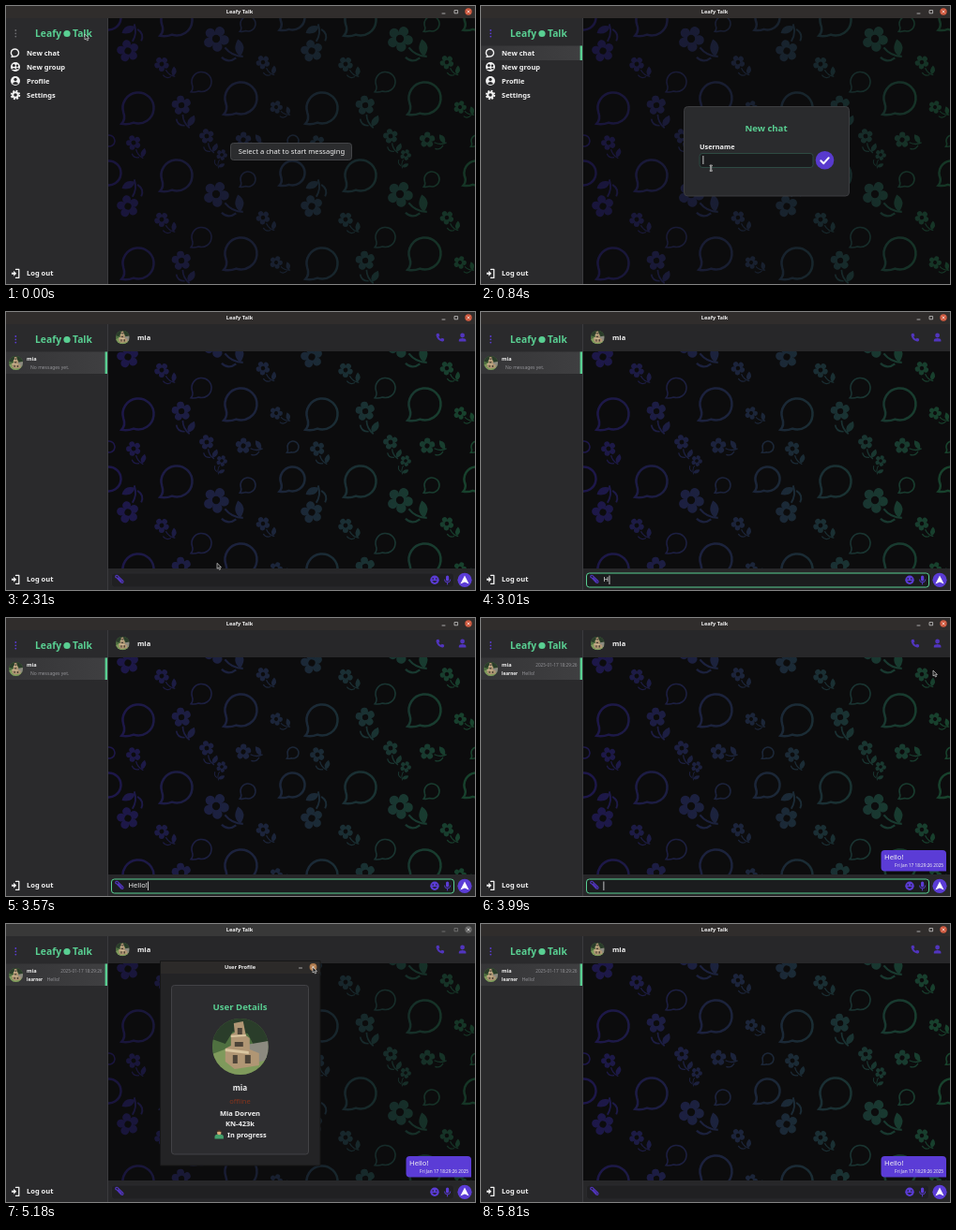
Recreate the animation shown at these times as an HTML page. Size 500 px wide and 297 px high, loop 5880 ms.

```html
<!DOCTYPE html>
<html lang="en">
<head>
<meta charset="utf-8">
<title>Messenger demo</title>
<style>
html, body { margin: 0; width: 100%; height: 100%; overflow: hidden; background: #0c0c0d; }
svg { display: block; width: 100vw; height: 100vh; }
text { font: 7.5px "Noto Sans", "Open Sans", sans-serif; fill: #f2f2f2; white-space: pre; }
.b { font-weight: 700; }
.m { text-anchor: middle; }
.e { text-anchor: end; }
.green { fill: #59cf92; }
.dim { fill: #929296; }
.tiny { font-size: 4.7px; }
.bar { font-size: 5.7px; }
.head { font-size: 9.6px; }
.line { fill: none; stroke-linecap: round; stroke-linejoin: round; }
.violet { fill: #5135bd; }
</style>
</head>
<body>
<svg viewBox="0 0 500 297" preserveAspectRatio="none">
  <defs>
    <linearGradient id="tint" gradientUnits="userSpaceOnUse" x1="109" y1="0" x2="500" y2="0">
      <stop offset="0" stop-color="#1f1850"/>
      <stop offset=".52" stop-color="#1d2a3b"/>
      <stop offset="1" stop-color="#19482f"/>
    </linearGradient>
    <linearGradient id="row">
      <stop offset="0" stop-color="#353537"/>
      <stop offset="1" stop-color="#3f3f41"/>
    </linearGradient>
    <clipPath id="round"><circle r="30"/></clipPath>
    <g id="tile" fill="none" stroke="#fff"></g>
    <mask id="doodles" maskUnits="userSpaceOnUse" x="109" y="13" width="391" height="284"></mask>
    <g id="photo" clip-path="url(#round)">
      <path fill="#4f7040" d="M-30-30h60v60h-60z"/>
      <path fill="#2a3d2a" d="M-30-30H30V-6L14-2 8-14-8-16-16-3-30-8z"/>
      <path fill="#7f9a5c" d="M-30 8L-14 2 4 16 30 10V30H-30z"/>
      <path fill="#8c8a80" d="M6-2L30-6V14L12 18z"/>
      <path fill="#b09674" d="M-7-25L3-27 6-12 10-9V3l10 4v13l-26 4-10-8V2l6-3v-12l4-2z"/>
      <path fill="#4d4438" d="M-3-20h5v7h-5zM-6-5h9v5h-9zM-8 9h5v9h-5zM5 9h6v9H5z"/>
      <path fill="#dac6a0" d="M-16 2L9 5v3l-25-3zM-10-12l16-1v2l-16 1z"/>
    </g>
  </defs>

  <path fill="#0c0c0d" d="M0 0h500v297H0z"/>
  <path id="wall" fill="url(#tint)" mask="url(#doodles)" d="M109 13h391v284H109z"/>

  <path fill="#2a2a2c" d="M0 13h108v284H0z"/>
  <path fill="#3b3b3e" d="M108 13h1v284h-1z"/>
  <path id="titleBar" d="M0 0h500v13H0z"/>
  <text class="b m bar" x="249" y="8.3">Leafy Talk</text>
  <path id="buttons" class="line" stroke-width=".7" d="M465 8h3M478.4 4.6h3.2v3.2h-3.2z"/>
  <circle id="close" cx="493" cy="6" r="3.7"/>
  <path class="line" stroke="#fff" stroke-width=".6" d="M491.8 4.8l2.4 2.4m0-2.4l-2.4 2.4"/>

  <g id="dots"><circle cx="10.3" cy="26" r=".9"/><circle cx="10.3" cy="29.3" r=".9"/><circle cx="10.3" cy="32.6" r=".9"/></g>
  <text class="b e green" style="font-size:10.3px" x="59" y="33">Leafy</text>
  <circle cx="65" cy="29.5" r="3.6" fill="#59cf92"/>
  <text class="b green" style="font-size:10.3px" x="71" y="33">Talk</text>

  <g id="menu">
    <g id="picked"><path fill="url(#row)" d="M0 42.5h108V58H0z"/><path fill="#59cf92" d="M105.6 42.5h2.4V58h-2.4z"/></g>
    <path class="line" stroke="#f2f2f2" stroke-width="1.4" d="M7 53.2A4.1 4 0 1 1 9.2 54L6 54.4z"/>
    <circle cx="10" cy="65" r="5" fill="#f2f2f2"/>
    <g fill="#2a2a2c"><circle cx="8.4" cy="63.5" r="1.5"/><circle cx="12" cy="63.7" r="1.2"/><path d="M5.8 68q2.6-3.6 5.2 0zM11.6 67.8q-.3-1.4-.8-1.8 2-.8 3.2 1.2z"/></g>
    <circle cx="10" cy="80" r="5" fill="#f2f2f2"/>
    <g fill="#2a2a2c"><circle cx="10" cy="78.5" r="1.7"/><path d="M6.8 83q3.2-3.8 6.4 0-3 2-6.4 0z"/></g>
    <circle cx="10" cy="95" r="4.3" fill="none" stroke="#f2f2f2" stroke-width="1.8" stroke-dasharray="1.9 1.477"/>
    <circle cx="10" cy="95" r="2.8" fill="none" stroke="#f2f2f2" stroke-width="2"/>
    <text class="b" x="22" y="52.8">New chat</text>
    <text class="b" x="22" y="67.8">New group</text>
    <text class="b" x="22" y="82.8">Profile</text>
    <text class="b" x="22" y="97.8">Settings</text>
  </g>
  <path fill="#f2f2f2" d="M6 284.8h2.2v-2l3 3-3 3v-2H6z"/>
  <path class="line" stroke="#f2f2f2" stroke-width="1.3" d="M10.5 281.4h3.3v9h-3.3"/>
  <text class="b" x="22" y="288.4">Log out</text>

  <g id="hint">
    <rect x="239.5" y="146.5" width="129" height="18" rx="3" fill="#2b2c2e" stroke="#444548"/>
    <text class="m" style="font-size:7.6px" x="304.5" y="158.3">Select a chat to start messaging</text>
  </g>

  <g id="dialog">
    <rect x="216.5" y="107.5" width="176" height="95.5" rx="4" fill="#2a2b2d" stroke="#3c3d40"/>
    <text class="b m green head" x="304" y="133.7">New chat</text>
    <text class="b" style="font-size:7.3px" x="233" y="153">Username</text>
    <rect id="nameField" x="233" y="157.5" width="121" height="15" rx="3" fill="#1b1c1e"/>
    <text id="name" x="236.5" y="167.3"></text>
    <path id="nameCaret" fill="#eee" d="M0 160h.8v9H0z"/>
    <circle id="ok" cx="366.5" cy="164.8" r="9.8"/>
    <path class="line" stroke="#fff" stroke-width="2" d="M362.3 165.2l3 3 5.4-6"/>
  </g>

  <g id="chat">
    <path fill="url(#row)" d="M0 42.5h108V66H0z"/>
    <path fill="#59cf92" d="M105.6 42.5h2.4V66h-2.4z"/>
    <use href="#photo" transform="translate(10.5 54.5) scale(.25)"/>
    <text class="b" style="font-size:5.6px" x="22" y="52">mia</text>
    <text id="empty" class="dim" style="font-size:5px" x="26" y="61">No messages yet.</text>
    <g id="last">
      <text class="dim e tiny" x="102.5" y="51.8">2025-01-17 18:29:26</text>
      <text class="b tiny" x="22" y="60.8">learner</text>
      <text class="dim" style="font-size:5.2px" x="43.5" y="60.8">Hello!</text>
    </g>
    <path fill="#272729" d="M109 13h391v29H109zM109 274h391v23H109z"/>
    <use href="#photo" transform="translate(124.3 27) scale(.245)"/>
    <text class="b" x="140" y="30">mia</text>
    <path class="violet" d="M459.4 23l2-.3 1 2.6-1.1 1.1q.8 1.7 2.3 2.4l1.2-1 2.4 1-.3 2q-.7 1-2 .7-5.4-1.6-6.3-6.6 0-1.2.8-1.9z"/>
    <circle class="violet" cx="486.6" cy="25" r="2.4"/>
    <path class="violet" d="M482.8 31.5v-1.6q.5-1.9 3.8-1.9t3.8 1.9v1.6z"/>

    <rect id="field" x="112.5" y="279" width="365" height="15" rx="3"/>
    <path class="line" stroke="#5135bd" stroke-width="1.1" d="M117.2 283.2l5.6 5.8q1.7 1 2.2-.5.2-.8-.5-1.5l-5.5-5.4q-1.4-.8-2.1.3-.5.9.2 1.8M119.5 284l3.8 3.8"/>
    <text id="draft" x="130.5" y="288.4"></text>
    <path id="draftCaret" fill="#eee" d="M0 281.5h.8v9.5H0z"/>
    <circle cx="457" cy="286.3" r="4.7" fill="#5b3cd6"/>
    <g fill="#1d1d20"><circle cx="455.2" cy="285" r=".8"/><circle cx="458.8" cy="285" r=".8"/><path d="M454.4 287.3h5.2q-2.6 3.6-5.2 0z"/></g>
    <rect x="469" y="281.5" width="3.2" height="6" rx="1.6" fill="#5b3cd6"/>
    <path class="line" stroke="#5b3cd6" stroke-width=".9" d="M467.5 286q0 3 3.1 3t3.1-3M470.6 289v2"/>
    <circle cx="489" cy="286.3" r="7.6" fill="#5b3cd6"/>
    <path fill="#fff" d="M489 281.4l4.6 9-4.6-1.8-4.6 1.8z"/>
  </g>

  <g id="message">
    <path fill="#5b3cd6" d="M430.5 248h61.5q4 0 4 4v18.5h-65.500q-4 0-4-4V252q0-4 4-4z"/>
    <text style="font-size:7.6px" x="430" y="257.6">Hello!</text>
    <text class="e tiny" x="493" y="266">Fri Jan 17 18:29:26 2025</text>
  </g>

  <g id="profile">
    <path fill="#232325" stroke="#161617" d="M164.5 39.5H335V258H164.5z"/>
    <path fill="#2c2a29" d="M165 40h169.5v13H165z"/>
    <text class="b m bar" x="249.5" y="48.4">User Profile</text>
    <path class="line" stroke="#ddd" stroke-width=".7" d="M312.5 47h3"/>
    <circle cx="327.5" cy="46" r="3.9" fill="#b07a4c"/>
    <path class="line" stroke="#fff" stroke-width=".6" d="M326.3 44.8l2.4 2.4m0-2.4l-2.4 2.4"/>
    <rect x="176.5" y="65.5" width="146" height="180.5" rx="3" fill="#2c2c2f" stroke="#424246"/>
    <text class="b m green head" x="249.5" y="91.5">User Details</text>
    <use href="#photo" transform="translate(249.8 131)"/>
    <text class="b m" style="font-size:8.2px" x="249.5" y="177.500">mia</text>
    <text class="m" style="fill:#85341d" x="249.5" y="192">offline</text>
    <text class="b m" x="249.5" y="205">Mia Dorven</text>
    <text class="b m" x="249.5" y="216.3">KN-423k</text>
    <path fill="#43a06b" d="M222.5 229.5V227q0-2.5 4.7-2.5t4.700 2.5v2.5z"/>
    <circle cx="227.2" cy="223" r="2.3" fill="#d9a878"/>
    <path fill="#4b3527" d="M224.7 222.6q0-2.5 2.5-2.5t2.5 2.5q-2.500-1.5-5 0z"/>
    <text class="b" style="font-size:7.4px" x="236" y="227.6">In progress</text>
  </g>

  <path id="pointer" fill="#202020" stroke="#ededed" stroke-width=".6"/>
</svg>
<script>
const LOOP = 5880, STEP = 70;
const ARROW = 'M0 0v6l1.4-1.2 1.1 2.2 1.1-.5-1-2.1h1.9z';
const BEAM = 'M0 0h2.4v.8h-.7v4.800h.7v.8H0v-.8h.7V.8H0z';
const $ = id => document.getElementById(id);
const show = (id, on) => $(id).style.display = on ? '' : 'none';
const set = (id, name, value) => $(id).setAttribute(name, value);

function bubble(x, y, r) {
  return `<path transform="translate(${x} ${y})" stroke-width="${r > 12 ? 2.5 : 1.6}"
    d="M${-.95 * r} ${.31 * r}A${r} ${r} 0 1 1 ${-.3 * r} ${.95 * r}
    Q${-.7 * r} ${1.1 * r} ${-1.08 * r} ${1.02 * r}Q${-.8 * r} ${.72 * r} ${-.95 * r} ${.31 * r}z"/>`;
}

// Solid petals around an open centre; the stem and its leaf hang below before turning.
function flower(x, y, r, turn) {
  let petals = '';
  for (let i = 0; i < 5; i++)
    petals += `<circle cy="-.62" r=".37" transform="rotate(${72 * i})"/>`;
  return `<g transform="translate(${x} ${y}) rotate(${turn}) scale(${r})" stroke="none" fill="#fff">${petals}
    <circle r=".5"/><circle r=".3" fill="#000"/>
    <path d="M.35 2.25Q.2 1.45 1.15 1.2Q1.35 2.1 .35 2.25z"/>
    <path fill="none" stroke="#fff" stroke-width=".16" d="M0 .95Q-.1 1.8 .5 2.4M.05 2.1Q-.7 2-.7 1.3"/></g>`;
}

const bubbles = [[141, 109, 16.5], [250.5, 98.5, 17], [182, 181, 16.5], [305.5, 178.5, 13],
  [208.5, 81, 10.5], [258, 185, 8], [306, 144, 6]];
const flowers = [[187, 106, 10.5, -8], [224, 201, 14, -45], [130, 214, 12, 205], [136, 146, 8, -20],
  [214, 139, 8, -12], [230, 159, 6, 25], [253, 143, 8.5, -70], [288, 108, 7, -50],
  [166, 228, 8, -35], [274, 226, 7.5, -30]];
$('tile').innerHTML = bubbles.map(b => bubble(...b)).join('') + flowers.map(f => flower(...f)).join('');
for (const dx of [-196, 0, 196, 392])
  for (const dy of [-166, 0, 166])
    $('doodles').innerHTML += `<use href="#tile" x="${dx}" y="${dy}"/>`;

const route = [[0, 84, 30], [140, 80, 33], [420, 45, 50], [560, 45, 50], [840, 244, 170], [1400, 244, 170],
  [1750, 368, 167], [2030, 368, 167], [2400, 200, 286], [3570, 200, 286], [3990, 482, 56],
  [4200, 486, 27], [4410, 486, 27], [4970, 327, 46], [5250, 327, 46], [5600, 420, 150]];

function pointerAt(t) {
  const i = route.findIndex(p => p[0] > t);
  if (i < 0) return route.at(-1).slice(1);
  const [t0, x0, y0] = route[i - 1], [t1, x1, y1] = route[i];
  const u = (t - t0) / (t1 - t0), k = u * u * (3 - 2 * u);
  return [x0 + (x1 - x0) * k, y0 + (y1 - y0) * k];
}

function type(id, word, times, t, x) {
  $(id).textContent = word.slice(0, times.filter(s => t >= s).length);
  const end = x + ($(id).textContent ? $(id).getComputedTextLength() + .5 : 0);
  set(id + 'Caret', 'transform', `translate(${end} 0)`);
}

function draw(t) {
  const picked = t >= 490, chat = t >= 2030, sent = t >= 3640;
  const profile = t >= 4340 && t < 5320, focus = t >= 2450 && t < 4340;
  const overField = t >= 770 && t < 1470 || t >= 2380 && t < 2660;
  show('menu', !chat);
  show('picked', picked);
  show('hint', !picked);
  show('dialog', picked && !chat);
  show('chat', chat);
  show('empty', !sent);
  show('last', sent);
  show('message', sent);
  show('profile', profile);
  show('nameCaret', t < 1680);
  show('draftCaret', focus);
  show('pointer', t < 2660 || t >= 3640 && t < 5500);

  set('wall', 'opacity', chat && !profile ? .92 : .72);
  set('titleBar', 'fill', profile ? '#383838' : '#302d2c');
  set('buttons', 'stroke', profile ? '#858585' : '#ddd');
  set('close', 'fill', profile ? '#666' : '#d05a40');
  set('dots', 'fill', t < 280 ? '#6c6c70' : '#5b3cd6');
  set('ok', 'fill', t >= 1700 ? '#6947ee' : '#583ace');
  set('nameField', 'stroke', t < 910 ? '#2d4a42' : '#4fb884');
  set('field', 'fill', focus ? '#1b1c1e' : '#202022');
  set('field', 'stroke', focus ? '#59cf92' : '#29292c');

  type('name', 'mia', [1260, 1400, 1540], t, 236.5);
  type('draft', sent ? '' : 'Hello!', [2940, 3080, 3150, 3220, 3290, 3360], t, 130.5);
  set('pointer', 'd', overField ? BEAM : ARROW);
  set('pointer', 'transform', `translate(${pointerAt(t)})`);
}

const start = performance.now();
function tick() {
  const t = (performance.now() - start) % LOOP;
  draw(Math.floor(t / STEP) * STEP);
  requestAnimationFrame(tick);
}
tick();
</script>
</body>
</html>
```
